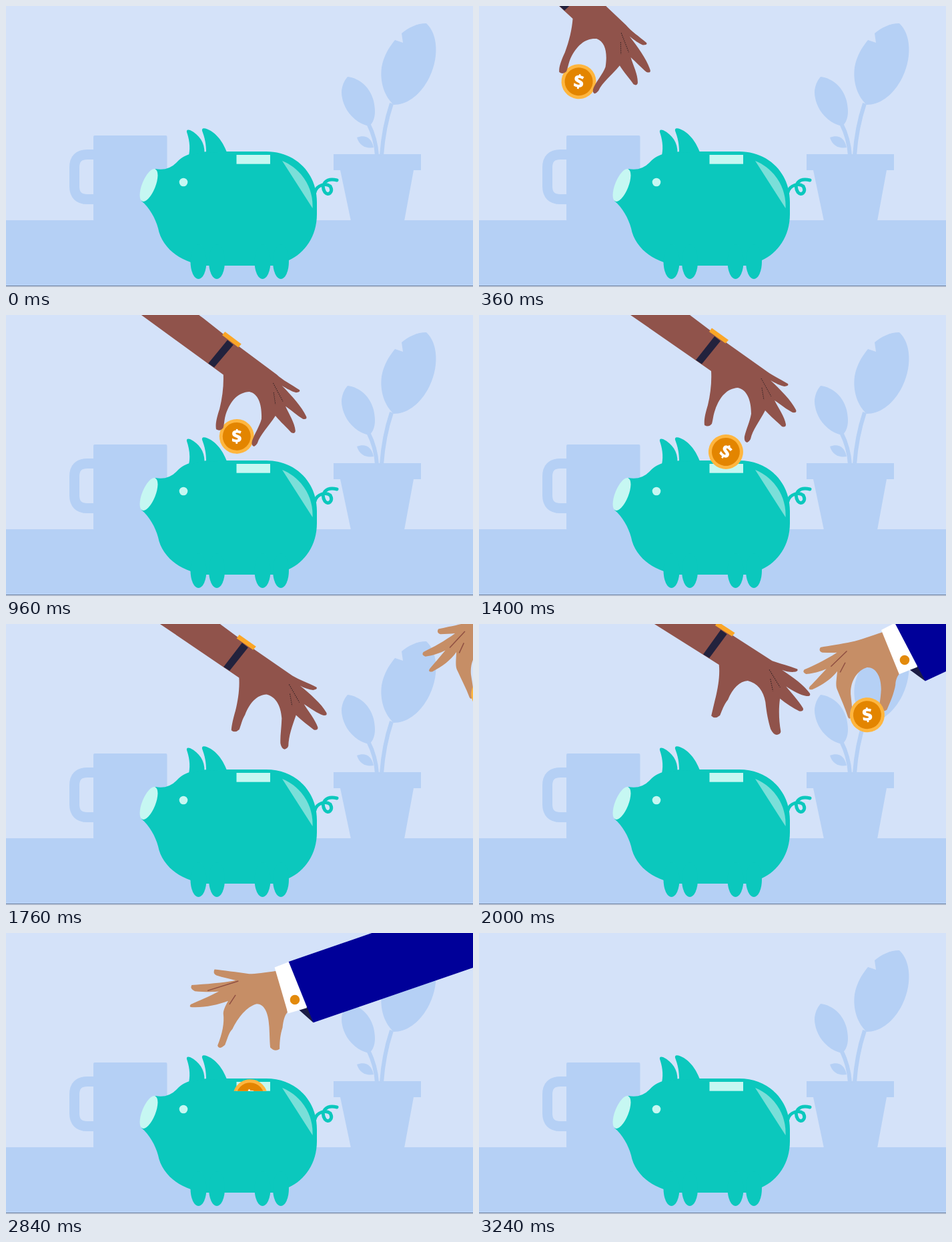
An HTML page for the animation above (3.32 s loop, 700 by 421 pixels).

```html
<!DOCTYPE html>
<html lang="en">
<head>
<meta charset="utf-8">
<title>Piggy bank</title>
<style>
  html, body { margin: 0; width: 100%; height: 100%; overflow: hidden; background: #d4e2f9; }
  svg { display: block; width: 100vw; height: 100vh; }
  .coin text { font: 800 27px "Open Sans", "Noto Sans", sans-serif; fill: #fff; text-anchor: middle; }
</style>
</head>
<body>
<svg viewBox="0 0 700 421">
  <defs>
    <clipPath id="aboveSlot"><rect width="700" height="236.7"/></clipPath>
    <g id="coinArt" class="coin">
      <circle r="26" fill="#ffb63f"/>
      <circle r="21" fill="#e38500"/>
      <text y="9.5">$</text>
    </g>
  </defs>

  <rect width="700" height="421" fill="#d4e2f9"/>
  <g fill="#b5d0f5">
    <rect y="321" width="700" height="98"/>
    <rect x="131" y="194" width="110.5" height="128" rx="2"/>
    <path d="M131 222.5H122Q102.500 222.500 102.500 242V270Q102.500 289.500 122 289.500H131" fill="none" stroke="#b5d0f5" stroke-width="15"/>
    <path d="M491 222H622V246H611L597 322H517L501 246H491Z"/>
    <path d="M630 26C648 42 650 80 632 112C618 136 600 148 581 148C568 136 560 115 563 92C566 75 574 62 583 51L595 55L593 41C604 32 616 26 630 26Z"/>
    <path d="M512 106C530 108 546 122 551 142C555 160 553 172 545 180C524 176 508 158 504 138C501 126 505 114 512 106Z"/>
    <path d="M526 197C538 192 548 197 551 212C540 214 530 210 526 197Z"/>
    <path d="M563 224C565 195 570 170 578 146M556 224C555 207 551 192 543 176" fill="none" stroke="#b5d0f5" stroke-width="6"/>
  </g>
  <rect y="419" width="700" height="1" fill="#66748c"/>
  <rect y="420" width="700" height="1" fill="#dfe8f8"/>

  <g fill="#0bc8bd">
    <path d="M224 244Q244 248 258 232C264 226 270 224 275 222Q300 216 331 218H390C434 218 466 250 466 294V312C466 345 448 370 424 381L410 389H300L277 384C250 375 232 355 228 333C224 318 215 302 203 292Z"/>
    <path d="M274 224C277 210 274 198 271 189Q270 184 276 186C290 193 298 205 297.500 220Z"/>
    <path d="M300 220C300 206 298 198 294 187Q293 182 299 183.500C314 188 325 203 331 219Z"/>
    <ellipse cx="288.500" cy="383" rx="12" ry="26"/>
    <ellipse cx="316" cy="383" rx="12" ry="26"/>
    <ellipse cx="384.500" cy="383" rx="12" ry="26"/>
    <ellipse cx="412" cy="383" rx="12" ry="26"/>
    <path d="M463 279C466 268 479 265 486 270C491 279 483 285 478 279C471 268 479 257 496 261" fill="none" stroke="#0bc8bd" stroke-width="5" stroke-linecap="round"/>
  </g>
  <g fill="#c6f7f2">
    <ellipse cx="214" cy="268.500" rx="10" ry="26" transform="rotate(22 214 268.500)"/>
    <circle cx="266" cy="264" r="6.300"/>
    <rect x="345.500" y="223" width="50.500" height="13.700"/>
    <path d="M414 232C441 243 461 270 459.500 303Z" fill="#7adfd9"/>
  </g>

  <g clip-path="url(#aboveSlot)"><use id="coin1" href="#coinArt"/></g>
  <g id="hand1">
    <path class="skin" fill="#90534b"/>
    <path d="M423 95L438 122M424 109L427 127" stroke="#2c1f22" stroke-dasharray="1.500 1.500"/>
    <path d="M325 67.500L334 73.500L362 39L353 32Z" fill="#22223d"/>
    <path d="M349 19.500L374 37.500L369.500 42.500L345 25Z" fill="#faa628"/>
  </g>
  <g id="hand2">
    <path class="skin" fill="#c68e66"/>
    <path class="crease" fill="none" stroke="#8f4f42" stroke-width="1.500"/>
    <path d="M462 108L485 128L480 104Z" fill="#1b1c45"/>
    <path d="M426 46L448 37L475 106L447 114.500Z" fill="#fff"/>
    <path d="M447 37L1012-165L1050-74L485 128Z" fill="#000099"/>
    <circle cx="457" cy="94" r="7.300" fill="#e38a0c"/>
  </g>
  <g clip-path="url(#aboveSlot)"><use id="coin2" href="#coinArt"/></g>
</svg>
<script>
const LOOP = 3320, TICK = 40;
const $ = s => document.querySelector(s);

// Blends two outlines that share the same commands.
function morph(a, b) {
  const to = b.match(/-?\d+/g);
  return k => {
    let i = 0;
    return a.replace(/-?\d+/g, n => (+n + (to[i++] - n) * k).toFixed(2));
  };
}

// Smooth curve through rows of [time, ...values].
function track(rows) {
  const slope = (i, c) => {
    const p = rows[Math.max(i - 1, 0)], n = rows[Math.min(i + 1, rows.length - 1)];
    return (n[c] - p[c]) / (n[0] - p[0]);
  };
  return t => {
    let i = rows.findIndex(r => r[0] > t) - 1;
    if (i < 0) i = rows.length - 2;
    const a = rows[i], b = rows[i + 1], d = b[0] - a[0];
    const u = Math.min(1, Math.max(0, (t - a[0]) / d)), v = 1 - u;
    return a.slice(1).map((_, j) => {
      const c = j + 1;
      return a[c] * v * v * (1 + 2 * u) + b[c] * u * u * (3 - 2 * u)
        + d * u * v * (v * slope(i, c) - u * slope(i + 1, c));
    });
  };
}

// Track rows: time, pivot x, pivot y, angle, how far the hand is open.
const hands = [
  {
    el: $('#hand1'), coin: $('#coin1'), pivot: [325, 68], grip: [370, 176],
    start: 80, end: 2760, drop: 1263, drift: 0.024, spin: 0.23,
    skin: morph(
      'M-273 -347 L325 68 L348 84 C349 100 347 118 343 135 C339 148 337 158 338 165 Q344 169 349 163 C351 156 351 150 354 142 C361 122 372 110 388 109 C402 112 408 128 408 148 C406 160 400 172 398 182 Q397 190 402 191 Q405 190 407 186 C410 172 420 160 429 143 C437 152 447 160 454 167 Q460 169 460 164 C458 152 449 140 443 128 C452 134 462 142 470 146 Q477 147 475 142 C468 128 452 112 437 98 C444 102 452 106 458 107 Q465 106 463 103 C450 95 438 90 428 82 L373 43 L316 0 L-184 -347 Z',
      'M-273 -347 L325 68 L348 84 C349 100 345 118 341 132 C338 142 335 153 333 160 Q338 166 346 160 C350 152 352 145 359 137 C367 120 378 110 390 110 C404 114 413 126 415 143 C416 160 418 172 421 184 Q425 193 430 193 Q436 192 436 188 C434 172 434 156 437 139 C446 147 456 154 465 159 Q472 160 471 155 C465 143 454 131 447 121 C458 129 468 135 477 137 Q484 138 482 133 C474 120 458 108 442 96 C448 99 454 100 460 100 Q467 99 465 96 C452 90 440 87 428 82 L373 43 L316 0 L-184 -347 Z'),
    at: track([
      [80, 50, -138, 9, -0.2],
      [360, 120, 0, 8, -0.2],
      [500, 168, 57, 7, -0.2],
      [640, 221, 79, 6, -0.2],
      [840, 281, 76, 2.5, -0.2],
      [1000, 308, 72, 1, -0.2],
      [1200, 320, 69, 0.5, -0.2],
      [1400, 325, 68, 0, 0],
      [1720, 325.5, 66, -0.4, 0.4],
      [2000, 336, 46, -2.6, 1],
      [2320, 382, -37, -5, 1],
      [2560, 435, -135, -7, 1],
      [2760, 490, -240, -8, 1]
    ])
  },
  {
    el: $('#hand2'), coin: $('#coin2'), pivot: [457, 94], grip: [394, 171],
    start: 1760, end: 3240, drop: 2624, drift: -0.014, spin: -0.05,
    skin: morph(
      'M436 46 L426 50 C412 53 392 59 380 60 C365 62 345 63 333 64 Q329 69 335 72 C343 73 350 74 357 74 C340 83 322 90 306 95 Q302 99 308 102 C320 102 330 100 339 97 C330 105 320 114 312 121 Q308 126 315 126 C330 121 345 113 355 102 C352 118 350 124 353 131 C357 145 362 158 365 172 Q367 177 371 171 C373 158 372 150 372 138 C373 118 385 103 400 100 C413 101 420 115 418 135 C416 150 413 158 412 164 Q418 170 424 166 C430 155 437 142 440 130 C441 122 444 117 448 113 Z',
      'M436 46 L429 51 C412 54 396 56 388 56 C370 54 348 51 336 50 Q333 56 339 59 C349 62 359 64 368 66 C350 70 322 72 302 74 Q299 80 307 83 C320 84 334 84 343 83 C330 90 312 98 301 103 Q297 108 306 107 C324 107 342 103 357 97 C352 106 350 112 350 116 C352 130 349 146 342 164 Q344 171 353 163 C358 150 358 146 364 139 C372 122 385 105 400 101 C413 101 418 118 419 135 C420 150 420 158 421 166 Q428 173 435 168 C435 155 436 146 439 136 C440 125 442 118 446 113 Z'),
    crease: morph('M346 94 L372 73 M359 104 L368 90', 'M326 82 L372 67 M359 102 L368 88'),
    at: track([
      [1760, 775, 20, -8, 0],
      [2000, 638, 54, -5, 0],
      [2160, 540, 78, -2.5, 0],
      [2320, 457, 94, 0, 0],
      [2460, 436, 99, 0.5, 0],
      [2624, 433, 99, 0.7, 0],
      [2840, 433, 100, 0.7, 1],
      [2960, 422, 76, 1.2, 1],
      [3080, 395, 24, 2, 1],
      [3160, 368, -28, 2.5, 1],
      [3240, 330, -100, 3, 1]
    ])
  }
];

function gripAt(h, t) {
  const [x, y, angle] = h.at(t), r = angle * Math.PI / 180;
  const dx = h.grip[0] - h.pivot[0], dy = h.grip[1] - h.pivot[1];
  return [x + dx * Math.cos(r) - dy * Math.sin(r), y + dx * Math.sin(r) + dy * Math.cos(r), angle];
}

function show(el, on) {
  el.style.display = on ? '' : 'none';
}

function drawHand(h, t) {
  const live = t >= h.start && t < h.end, fall = Math.max(0, t - h.drop);
  show(h.el, live);
  show(h.coin, live && fall < 300);
  if (!live) return;
  const [x, y, angle, open] = h.at(t), [px, py] = h.pivot;
  h.el.setAttribute('transform', `translate(${x} ${y}) rotate(${angle}) translate(${-px} ${-py})`);
  h.el.querySelector('.skin').setAttribute('d', h.skin(open));
  if (h.crease) h.el.querySelector('.crease').setAttribute('d', h.crease(open));
  const [cx, cy, tilt] = gripAt(h, Math.min(t, h.drop));
  h.coin.setAttribute('transform',
    `translate(${cx + h.drift * fall} ${cy + 0.0015 * fall * fall}) rotate(${tilt + h.spin * fall})`);
}

const began = performance.now();
function frame() {
  const t = Math.floor((performance.now() - began) % LOOP / TICK) * TICK;
  hands.forEach(h => drawHand(h, t));
  requestAnimationFrame(frame);
}
frame();
</script>
</body>
</html>
```
